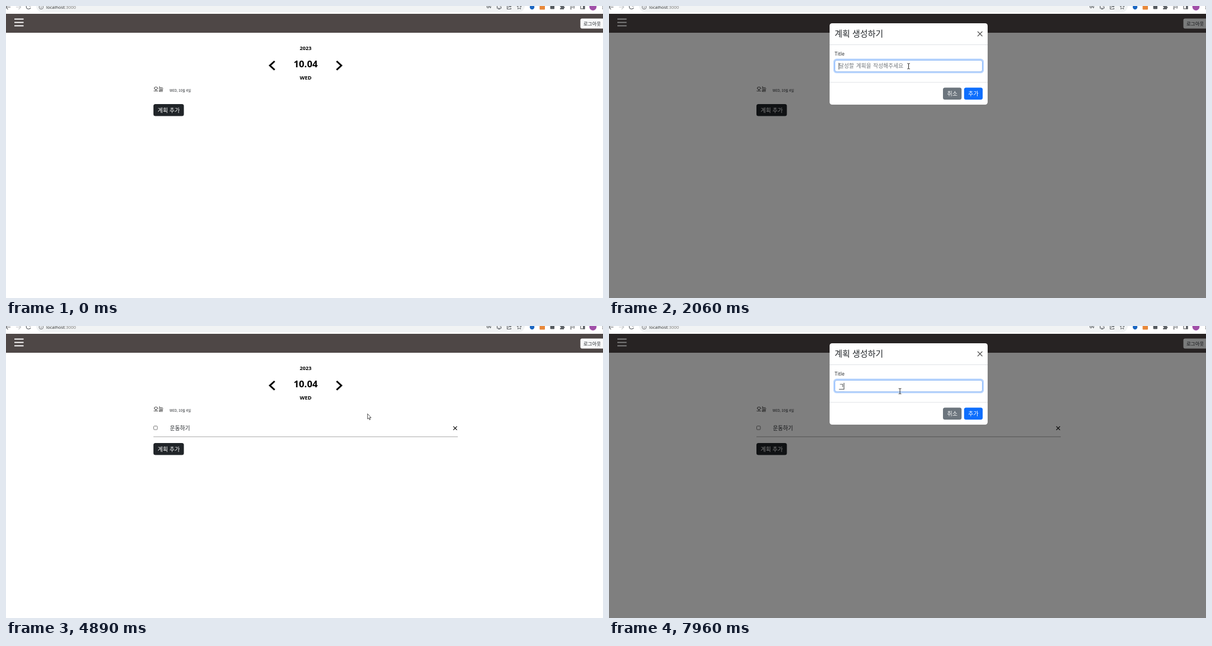
Recreate the animation shown at these times as an HTML page. Size 1069 px wide and 524 px high, loop 8000 ms.

```html
<!DOCTYPE html>
<html lang="ko">
<head>
<meta charset="utf-8">
<title>계획 추가</title>
<style>
  html, body { margin: 0; width: 100%; height: 100%; overflow: hidden; background: #fff; }
  svg { display: block; width: 1069px; height: 524px; }
  text { font: 9.8px "Noto Sans CJK KR", "Noto Sans CJK", sans-serif; fill: #212529; white-space: pre; }
  .latin { font-family: "Open Sans", "Noto Sans", sans-serif; }
  .date { font-weight: 700; fill: #000; text-anchor: middle; }
  .label { fill: #fff; text-anchor: middle; font-size: 10px; }
  .line { fill: none; stroke: #000; }
  .icon { fill: none; stroke: #5f6368; stroke-width: 1.2; }
</style>
</head>
<body>
<svg viewBox="0 0 1069 524">
  <defs>
    <clipPath id="view"><rect y="14" width="1069" height="510"/></clipPath>
  </defs>

  <!-- browser bar -->
  <rect x="54" y="-12" width="875" height="23" rx="11" fill="#f1f3f4"/>
  <g class="icon">
    <path d="M8 2H0M3.500-2L-.5 2L3.500 6"/>
    <path d="M18 2H26M22.500-2L26.500 2L22.500 6" stroke="#c4c6c9"/>
    <path d="M43.500-1A4 4 0 1 0 44 3M44-3V0H41"/>
    <circle cx="63" cy="2" r="3.700" stroke-width=".9"/>
    <path d="M63 1.500V4M63-.5V.5" stroke-width=".9"/>
    <circle cx="863" cy="1.500" r="1.800"/>
    <path d="M865 1.500H869M867.500 1.500V4"/>
    <path d="M883-2H879.500V4H886.500V1M881 5.500H885M885-3V1"/>
    <path d="M899-1H897.500V5.500H904V3.500M899.500 3Q900 0 904.500 0M902.500-2L904.700 0L902.500 2"/>
    <path d="M919-2.500L920.200 .4L923 .7L920.900 2.600L921.600 5.500L919 4L916.400 5.500L917.100 2.600L915 .7L917.800 .4Z" stroke-width=".9"/>
    <path d="M1010-1H1017M1010 2H1015M1010 5H1013M1017-1V4.500" stroke-width="1.400"/>
    <rect x="1029" y="-2" width="7" height="7"/>
  </g>
  <circle cx="942" cy="2" r="4.200" fill="#1a66c2"/>
  <rect x="955.500" y="-3" width="9.500" height="9.500" rx="1" fill="#e8883a"/>
  <rect x="974.500" y="-2" width="7.500" height="7.500" rx="1" fill="#555a5f"/>
  <path d="M992-1H994.500A1.500 1.500 0 0 1 997.500-1H999V1A1.500 1.500 0 0 1 999 4V6H992V4A1.500 1.500 0 0 0 992 1Z" fill="#5f6368"/>
  <rect x="1033" y="-2" width="3.500" height="7.500" fill="#5f6368"/>
  <circle cx="1051" cy="1.500" r="6.400" fill="#a04fa8"/>
  <path d="M1068.500-2V6" stroke="#5f6368" stroke-width="1.500" stroke-dasharray="1.500"/>
  <text class="latin" x="72" y="5" style="font-size:7.900px">localhost<tspan fill="#777">:3000</tspan></text>

  <!-- page -->
  <rect y="14" width="1069" height="34" fill="#4e4746"/>
  <path d="M15 23.500H31.500M15 29.500H31.500M15 35.500H31.500" stroke="#fff" stroke-width="2"/>
  <rect x="1028.500" y="22.500" width="50" height="18" rx="3" fill="#f8f9fa"/>
  <text x="1034" y="34.500" style="font-size:8.500px">로그아웃</text>
  <text class="latin date" x="536.500" y="79.300" style="font-size:9.200px">2023</text>
  <text class="latin date" x="536.500" y="109.600" style="font-size:16.800px">10.04</text>
  <text class="latin date" x="536.500" y="132" style="font-size:9.300px">WED</text>
  <path class="line" d="M481 99L472.500 106.800L481 114.600M592 99L600.500 106.800L592 114.600" stroke-width="3"/>
  <text x="264" y="153.300" style="font-weight:500;fill:#000">오늘</text>
  <text x="293" y="154" style="font-size:5.900px">WED, 10월 4일</text>
  <g id="item">
    <rect x="264.500" y="179.500" width="6.500" height="6.500" rx="1.200" fill="#fff" stroke="#767676"/>
    <text x="293.500" y="186.600">운동하기</text>
    <path class="line" d="M801 180.200L807.500 186.700M807.500 180.200L801 186.700" stroke-width="1.200"/>
    <path d="M264 198.800H809" stroke="#a6a6a6"/>
  </g>
  <g id="add">
    <rect id="addBox" x="264" y="176" width="54.500" height="21.500" rx="3.500"/>
    <text class="label" x="291.300" y="190.600">계획 추가</text>
  </g>

  <!-- dialog -->
  <rect id="shade" y="14" width="1069" height="510"/>
  <g clip-path="url(#view)">
    <g id="modal">
      <rect x="395" y="31" width="283" height="146" rx="4.500" fill="#fff"/>
      <path d="M395 69.500H678M395 137H678" stroke="#dee2e6"/>
      <text x="404" y="55.300" style="font-size:15px">계획 생성하기</text>
      <path class="line" d="M660 45.700L668.500 54.200M668.500 45.700L660 54.200" stroke-width="1.300" style="stroke:#555"/>
      <text class="latin" x="404" y="89.300" style="font-size:9px">Title</text>
      <rect id="ring" x="403" y="95.800" width="267" height="23.600" rx="4.500" fill="none" stroke="#0d6efd" stroke-opacity=".3" stroke-width="2.400"/>
      <rect x="404.500" y="97.300" width="264" height="20.700" rx="3.300" fill="#fff" stroke="#d6dbe0"/>
      <rect id="edge" x="404.500" y="97.300" width="264" height="20.700" rx="3.300" fill="none" stroke="#86b7fe"/>
      <text id="hint" x="411.800" y="111.300" style="fill:#73797f;word-spacing:.8px">달성할 계획을 작성해주세요</text>
      <text id="typed" x="411.800" y="111.300"></text>
      <path id="under" stroke="#212529" stroke-width=".8"/>
      <path id="caret" stroke="#212529" stroke-width=".9"/>
      <rect x="598" y="146.500" width="33.300" height="21.500" rx="3.500" fill="#6c757d"/>
      <text class="label" x="614.800" y="161">취소</text>
      <rect id="okBox" x="635.800" y="146.500" width="33.300" height="21.500" rx="3.500"/>
      <text class="label" x="652.500" y="161">추가</text>
    </g>
  </g>

  <g id="cursor">
    <path id="arrow" d="M.4 .4V9.800L2.500 7.900L4 11.300L5.500 10.600L4 7.400H6.800Z" fill="#fff" stroke="#222" stroke-width=".8"/>
    <path id="beam" d="M-2.300-4.800H-.6L0-4.200L.6-4.800H2.300M0-4.200V4.200M-2.300 4.800H-.6L0 4.200L.6 4.800H2.300" fill="none" stroke="#222"/>
    <path id="hand" d="M-1 6.500V1Q0-.6 1 1V4.500L4.500 5.300Q5.300 5.600 5.200 6.500L4.500 10.500V12.500H-.6V11L-3.500 7.500Q-3.300 5.500-1 7.500Z" fill="#fff" stroke="#222" stroke-width=".9"/>
  </g>
</svg>
<script>
const $ = id => document.getElementById(id);
const LOOP = 8000, GLYPH = 9.016;
const OPEN = [970, 6477], CLOSE = 4723, ITEM_AT = 4810;
const FOCUS = [1560, 7190], BLUR = 4590;

// pointer way points: time, x, y
const path = [
  [200, 1058, 467], [380, 800, 240], [540, 560, 80], [650, 420, 22], [780, 300, 120],
  [880, 261, 180], [940, 285, 186], [975, 285, 186], [1050, 385, 168], [1120, 491, 147],
  [1400, 530, 112], [1730, 536.5, 108], [3760, 536.5, 108], [4000, 590, 128],
  [4200, 671, 169], [4420, 648, 158], [4800, 648, 158], [4890, 647, 157], [5040, 642, 172],
  [5290, 642, 173], [5450, 730, 240], [5560, 782, 320], [5720, 600, 377], [5920, 340, 300],
  [6040, 257, 235], [6130, 281, 213], [6200, 283, 211], [6510, 283, 211],
  [6620, 350, 185], [6800, 480, 140], [6970, 517, 120], [7040, 521, 117], [LOOP, 521, 117]
];
// each keystroke composes the last syllable
const keys = ['ㅇ', '우', '운', '운ㄷ', '운도', '운동', '운동ㅎ', '운동하', '운동학', '운동하기'];
const keyTime = i => i < 6 ? 2660 + 70 * i : 3160 + 70 * (i - 6);

const clamp = v => Math.max(0, Math.min(1, v));
const easeOut = p => 1 - (1 - clamp(p)) ** 1.7;
const inside = ([x, y], l, t, r, b) => x >= l && x <= r && y >= t && y <= b;
const show = (id, on) => $(id).setAttribute('visibility', on ? 'visible' : 'hidden');
const set = (id, name, value) => $(id).setAttribute(name, value);

function pointer(t) {
  const i = path.findIndex(p => p[0] > t);
  if (i < 1) return path[0].slice(1);
  const [t0, x0, y0] = path[i - 1], [t1, x1, y1] = path[i];
  const p = (t - t0) / (t1 - t0);
  return [x0 + (x1 - x0) * p, y0 + (y1 - y0) * p];
}

function typedAt(t) {
  if (t >= 7960) return 'ㄱ';
  if (t > 6000) return '';
  return keys.filter((_, i) => t >= keyTime(i)).pop() || '';
}

function caretAt(t) {
  if (t < 5000) return t >= 2060 && t < BLUR && !(t >= 3830 && t < 4360);
  return t >= 7270 && t < 7810 || t >= 7960;
}

function draw(t) {
  const second = t >= 6000;
  const start = OPEN[+second], closing = !second && t >= CLOSE;
  const age = t - (closing ? CLOSE : start);
  const fade = closing ? 1 - clamp(age / 150) : clamp(age / 150);
  const rise = closing ? easeOut(age / 300) : 1 - easeOut(age / 300);
  set('shade', 'opacity', fade / 2);
  set('modal', 'opacity', fade);
  set('modal', 'transform', `translate(0 ${-28 * rise})`);

  const hasItem = t >= ITEM_AT, shift = hasItem ? 34 : 0;
  show('item', hasItem);
  set('add', 'transform', `translate(0 ${shift})`);

  const focus = clamp((t - FOCUS[+second]) / 150) * (second ? 1 : 1 - clamp((t - BLUR) / 150));
  set('ring', 'opacity', focus);
  set('edge', 'opacity', focus);

  const text = typedAt(t), end = 411.8 + text.length * GLYPH;
  $('typed').textContent = text;
  show('hint', !text);
  show('under', text && (second || t < BLUR));
  set('under', 'd', `M${end - GLYPH} 113.5H${end}`);
  show('caret', caretAt(t));
  set('caret', 'd', `M${end} 102V114`);

  const at = pointer(t);
  const overAdd = inside(at, 264, 176 + shift, 318, 197 + shift);
  const overOk = fade > .5 && inside(at, 636, 146, 669, 168);
  const overInput = fade > .5 && inside(at, 404, 97, 669, 118);
  set('addBox', 'fill', overAdd && fade < .5 ? '#3d4144' : '#212529');
  set('okBox', 'fill', !overOk ? '#0d6efd' : t >= BLUR ? '#0a58ca' : '#0b5ed7');

  const kind = overInput ? 'beam' : overOk || overAdd && fade === 0 ? 'hand' : 'arrow';
  for (const id of ['arrow', 'beam', 'hand']) show(id, t >= 200 && id === kind);
  set('cursor', 'transform', `translate(${at})`);
}

function tick() {
  draw(performance.now() % LOOP);
  requestAnimationFrame(tick);
}
tick();
</script>
</body>
</html>
```
